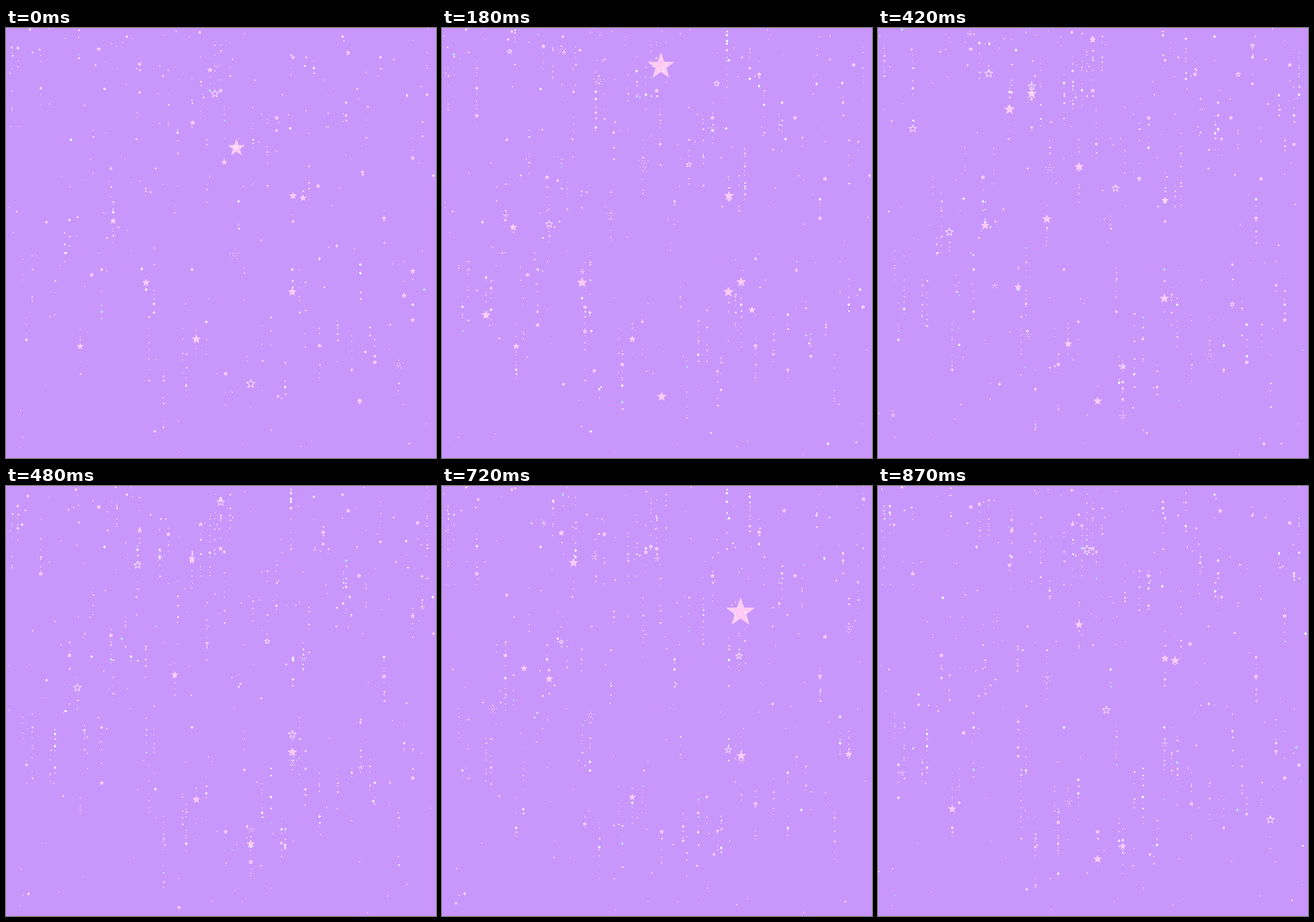
Animation of 600x600 px, one loop 900 ms. Source, as an HTML page with a canvas:

```html
<!DOCTYPE html>
<html lang="en">
<head>
<meta charset="utf-8">
<title>Star glitter</title>
<style>
  html, body { margin: 0; width: 100%; height: 100%; overflow: hidden; background: #c997fb; }
  canvas { display: block; width: 100vw; height: 100vh; }
</style>
</head>
<body>
<canvas id="sky" width="600" height="600"></canvas>
<script>
const ctx = document.getElementById('sky').getContext('2d');
const SIZE = 600, FRAMES = 30, STEP = 30, FALL = 3.2;
const BACK = '#c997fb', PINK = '#ffc9f3', PALE = '#ffe6fa', WHITE = '#ffffff', CYAN = '#b4e9fa';

// Spots where stars keep returning
const anchors = [
  [400, 237], [399, 371], [280, 190], [414, 240], [149, 272], [99, 281], [235, 263],
  [183, 110], [265, 437], [306, 517], [341, 499], [567, 377], [103, 447], [195, 358]
];
const giants = [
  { step: 0, x: 321, y: 167, r: 11.5 },
  { step: 6, x: 305, y: 53, r: 18.5 },
  { step: 24, x: 416, y: 176, r: 20 }
];

function noise(a, b = 0) {
  let h = Math.imul(a + 11, 374761393) ^ Math.imul(b + 7, 668265263);
  h = Math.imul(h ^ (h >>> 13), 1274126177);
  h = Math.imul(h ^ (h >>> 16), 2246822519);
  return ((h ^ (h >>> 15)) >>> 0) / 4294967296;
}

const sites = [];
function addSite(x, y) {
  const id = sites.length;
  sites.push({ id, x: Math.round(x), y: Math.round(y), size: noise(id, 901) });
}

function addStrand(x, top, length) {
  for (let y = top; y < top + length; y += 3 + 7 * noise(sites.length, 900)) addSite(x, y);
}

anchors.forEach(([x, y], i) => addStrand(x, y - 35, 50 + 40 * noise(i, 100)));
for (let i = 0; i < 76; i++) {
  // Golden-ratio spacing spreads the strands evenly; most hang near the top
  const x = 8 + (i * 0.618034 % 1) * (SIZE - 16);
  addStrand(x, 470 * noise(i, 201) ** 1.7, 35 + 75 * noise(i, 202));
}
for (let i = 0; i < 420; i++) {
  addSite(noise(i, 302) * SIZE, SIZE * noise(i, 303) ** 1.7);
}

const drifters = Array.from({ length: 120 }, (_, i) => {
  const spot = sites[Math.floor(noise(i, 501) * sites.length)];
  return {
    step: Math.floor(noise(i, 502) * FRAMES), x: spot.x, y: spot.y,
    r: 2.5 + 4.5 * noise(i, 503) ** 1.7, hollow: noise(i, 504) < 0.25
  };
});

function drawStar(x, y, r, mode) {
  ctx.fillStyle = mode === 'fill' ? PINK : PALE;
  ctx.beginPath();
  for (let i = 0; i < 10; i++) {
    const a = i * Math.PI / 5 - Math.PI / 2, d = i % 2 ? r * 0.4 : r;
    const px = x + 0.5 + d * Math.cos(a), py = y + 0.5 + d * Math.sin(a);
    if (mode === 'dots') ctx.fillRect(Math.round(px), Math.round(py), 1, 1);
    else ctx.lineTo(px, py);
  }
  if (mode === 'dots') return;
  ctx.closePath();
  if (mode === 'fill') ctx.fill();
  ctx.strokeStyle = PALE;
  ctx.lineWidth = mode === 'fill' ? 0.6 : 1;
  ctx.stroke();
}

// A star swells, shines, hollows out and breaks into dots as it falls
function drawLife(s, age) {
  const y = s.y + age * FALL;
  if (age === -1) drawStar(s.x, y, s.r * 0.7, 'fill');
  else if (age === 0) drawStar(s.x, y, s.r, s.hollow ? 'hollow' : 'fill');
  else if (age === 1) drawStar(s.x, y, s.r * 0.9, 'hollow');
  else if (age === 2) drawStar(s.x, y, s.r, 'dots');
}

function drawAnchor([x, y], i, step) {
  const beat = Math.floor(step / 3), mood = noise(i, beat + 700);
  if (mood > 0.6) return;
  const mode = mood < 0.4 ? 'fill' : mood < 0.53 ? 'hollow' : 'dots';
  drawStar(x, y + (step % 3 - 1) * FALL, 4 + 3 * noise(i, beat + 800), mode);
}

function drawSite(s, step) {
  const beat = Math.floor((step + s.id % 2) / 2) % (FRAMES / 2);
  const glow = noise(s.id, beat), lit = 0.3 + 0.025 * Math.min(step, 6);
  if (glow > lit) return;
  const tone = noise(s.id, beat + 50);
  ctx.fillStyle = tone < 0.04 ? CYAN : tone < 0.5 ? PALE : WHITE;
  if (s.size > 0.975) {
    drawStar(s.x, s.y, 2.8, 'fill');
  } else if (s.size > 0.88) {
    ctx.fillRect(s.x - 1, s.y, 3, 2);
    ctx.fillRect(s.x, s.y - 1, 1, 4);
  } else {
    ctx.fillRect(s.x, s.y, s.size > 0.7 ? 2 : 1, s.size > 0.35 ? 2 : 1);
  }
}

function drawGiant(g) {
  drawStar(g.x, g.y, g.r, 'fill');
  ctx.fillStyle = WHITE;
  for (let i = 0; i < 9; i++) {
    const dx = (noise(i, g.x) - 0.5) * g.r * 0.8, dy = (noise(i, g.x + 40) - 0.5) * g.r * 0.8;
    ctx.fillRect(Math.round(g.x + dx), Math.round(g.y + dy), 1, 2);
  }
}

function draw(step) {
  ctx.fillStyle = BACK;
  ctx.fillRect(0, 0, SIZE, SIZE);
  for (const s of sites) drawSite(s, step);
  for (const s of drifters) drawLife(s, (step - s.step + FRAMES + 1) % FRAMES - 1);
  anchors.forEach((a, i) => drawAnchor(a, i, step));
  for (const g of giants) if (g.step === step) drawGiant(g);
}

const start = performance.now();
let shown = -1;
function tick() {
  const step = Math.floor(Math.max(0, performance.now() - start) / STEP) % FRAMES;
  if (step !== shown) draw(shown = step);
  requestAnimationFrame(tick);
}
tick();
</script>
</body>
</html>
```
